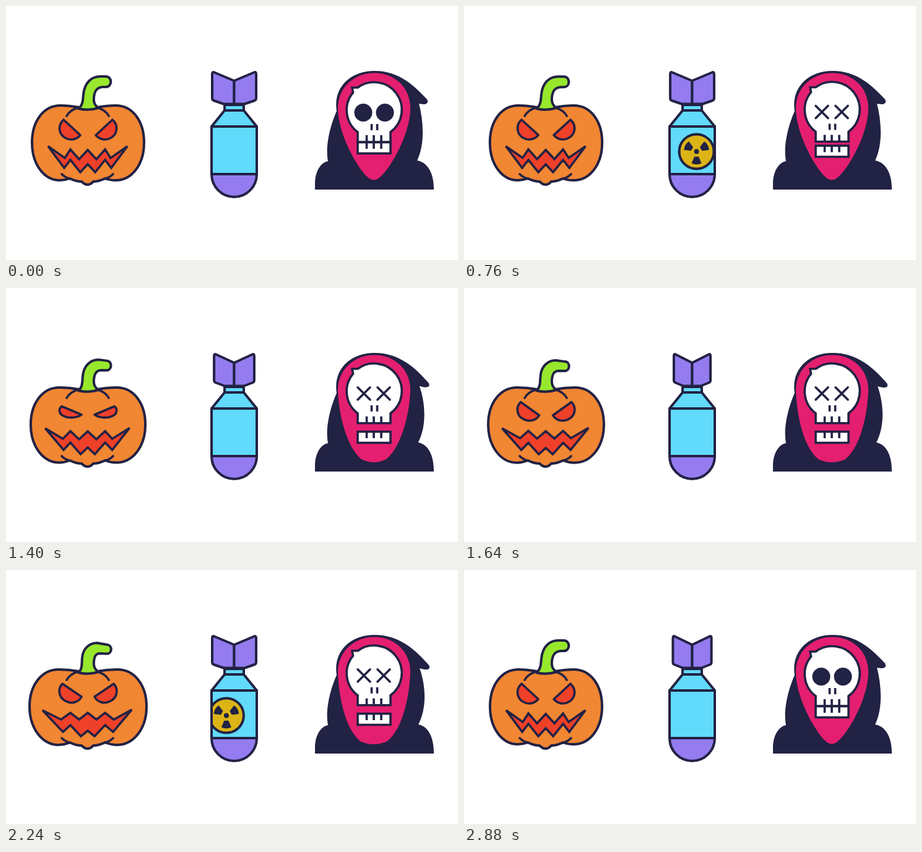
Write an HTML page that moves like this. It is 730 px wide and 411 px high and loops after 2920 ms.

```html
<!DOCTYPE html>
<html lang="en">
<head>
<meta charset="utf-8">
<title>Spooky icons</title>
<style>
  html, body { margin: 0; width: 100%; height: 100%; overflow: hidden; background: #fff; }
  svg { display: block; width: 730px; height: 411px; }
  .line { stroke: #222244; stroke-width: 4; stroke-linejoin: round; stroke-linecap: round; }
  .thin { stroke-width: 3.6; }
  .none { fill: none; }
  .butt { stroke-linecap: butt; }
  .miter { stroke-linejoin: miter; }
  .dark { fill: #222244; }
  .orange { fill: #f18633; }
  .red { fill: #ef4029; }
  .green { fill: #97e82c; }
  .purple { fill: #947cf0; }
  .cyan { fill: #61dafb; }
  .yellow { fill: #dcb416; }
  .pink { fill: #e41f70; }
  .white { fill: #fff; }
  #fins path { vector-effect: non-scaling-stroke; }
</style>
</head>
<body>
<svg viewBox="0 0 730 411">
  <defs>
    <clipPath id="hull"><rect x="332" y="195" width="73" height="77"/></clipPath>
    <path id="blade" d="M-3 9 L-7 18.5 Q0 21.5 7 18.5 L3 9 Z" stroke="#222244" stroke-width="1.5" stroke-linejoin="round"/>
    <g id="cross"><path class="line thin none" d="M-10 -10 L10 10 M10 -10 L-10 10"/></g>
  </defs>

  <g id="pumpkin">
    <path id="body" class="line orange"/>
    <path class="line thin none" d="M98 178 C101 172 107 167 118 164 M166 178 C163 172 157 167 146 164 M90 272 C94 276 98 278 103 279.500 M173 272 C169 276 165 278 160 279.500"/>
    <path id="stem" class="line green"/>
    <path id="eye" class="line thin red"/>
    <use href="#eye" transform="matrix(-1 0 0 1 265 0)"/>
    <path id="mouth" class="line thin red miter"/>
  </g>

  <g id="bomb">
    <path class="line cyan" d="M353 160 H384 V169 L405 195 V272 H332 V195 L353 169 Z"/>
    <g clip-path="url(#hull)">
      <g id="badge">
        <circle class="line yellow" r="28"/>
        <circle class="dark" r="4"/>
        <g class="dark">
          <use href="#blade"/>
          <use href="#blade" transform="rotate(120)"/>
          <use href="#blade" transform="rotate(240)"/>
        </g>
      </g>
    </g>
    <path class="line purple" d="M332 272 H405 A36.500 37 0 0 1 332 272 Z"/>
    <path class="line none" d="M353 169 H384 M332 195 H405 M332 195 V272 M405 195 V272"/>
    <g id="fins">
      <path id="fin" class="line purple" d="M0 121 L-32 107.500 Q-35.500 106 -35.500 110 V149 Q-35.500 152 -33 153 L-17 158.500 H0 Z"/>
      <path class="line purple" d="M0 121 L32 107.500 Q35.500 106 35.500 110 V149 Q35.500 152 33 153 L17 158.500 H0 Z"/>
    </g>
  </g>

  <g id="reaper">
    <path id="hood" class="dark"/>
    <path id="face" class="pink"/>
    <g id="jaw">
      <rect class="line thin white miter" x="568" y="220.500" width="53" height="18"/>
      <path class="line thin none butt" d="M582.500 221 V231 M594 221 V231 M606 221 V231"/>
    </g>
    <g id="head">
      <path class="line thin white miter" d="M568 220 V204 A44.500 44.500 0 0 1 560.500 140 L559 132 L568 132 A44.500 44.500 0 1 1 621 204 V220 Z"/>
      <path class="line thin none butt" d="M582.500 209 V220 M594 209 V220 M606 209 V220 M590.500 191 V201 M599.500 191 V201"/>
      <circle class="dark socket" cx="577" cy="172.500"/>
      <circle class="dark socket" cx="612" cy="172.500"/>
      <use class="mark" href="#cross" data-x="578"/>
      <use class="mark" href="#cross" data-x="610"/>
    </g>
  </g>
</svg>
<script>
  const LOOP = 2920, STEP = 40, SPIN = 1500;
  const BADGE_SPEED = 0.1425, BADGE_MID = [707, 2325];
  const NUM = /-?\d+(\.\d+)?/g;

  // Path pairs share one structure, so they can be blended number by number.
  const body = [
    "M118 164 C107 162 98 161 88 161 C60 161 42 187 42 221 C42 257 62 282 87 282 C94 282 98 281 103 279 C109 282 115 284 122 284 Q127 289 131.5 289 Q137 289 141 284 C149 284 154 282 160 279 C165 281 170 282 177 282 C203 282 223 257 223 221 C223 187 205 161 177 161 C167 161 158 162 147 164 Z",
    "M118 164 C107 162 97 161 85 161 C57 161 38 187 38 221 C38 257 59 283 85 283 C94 283 98 281 103 279 C109 282 115 284 122 284 Q127 289 131.5 289 Q137 289 141 284 C149 284 154 282 160 279 C165 281 170 283 179 283 C206 283 227 257 227 221 C227 187 208 161 180 161 C168 161 158 162 147 164 Z"
  ];
  const stem = [
    "M117 166 C125 160 124 150 125 143 C127 123 139 114 152 114 L161 114 C172 114 172 131 161 131 L156 131 C145 132 143 140 142 147 C141 157 144 161 149 165 Q133 170 117 166 Z",
    "M117 166 C124 160 122 150 123 142 C124 127 135 118 147 118 L164 121 C172 122 172 136 162 135.5 L152 135 C144 135 143 141 142 147 C141 157 144 161 149 165 Q133 170 117 166 Z"
  ];
  const eye = [
    "M93 184 L120 209 C113 217 103 218 95 213 C85 207 83 193 93 184 Z",
    "M91 184 L122 205 C117 215 105 217 96 212 C85 206 83 193 91 184 Z"
  ];
  const squint = "M90 191.5 L122 205 C113 211 99 211 91 206 C85 202 85 195 90 191.5 Z";
  const mouth = [
    "M68 227 L95 246 L104 232 L118 248 L132 233 L146 248 L160 232 L169 246 L196 227 L170 262 L160 249 L144 269 L132 256 L120 269 L104 249 L94 262 Z",
    "M59 227 L89 242 L104 231 L118 242 L132 231 L146 242 L160 231 L174 242 L203 226 L173 262 L160 251 L143 269 L132 260 L121 269 L104 251 L92 262 Z"
  ];
  const hood = [
    "M499 297 V285 C500 266 509 253 520 251 C515 225 525 190 534 170 C528 132 556 105 595 105 C636 105 660 130 680 151 C683 156 680 161 667 158 C675 190 676 225 664 250 C681 253 691 270 691 297 Z",
    "M499 297 V285 C500 266 509 253 520 251 C515 225 525 190 534 170 C528 132 556 105 595 105 C636 105 662 130 683 154 C686 159 683 164 668 159 C679 190 679 225 666 250 C682 253 691 270 691 297 Z"
  ];
  const face = [
    "M595 108.5 C561 108.5 536 133 536 165 C536 205 565 258 582 275 Q594 288 606 275 C624 258 653 205 653 165 C653 133 629 108.5 595 108.5 Z",
    "M595 108.5 C561 108.5 536 133 536 165 C537 200 546 255 572 277 Q594 287 616 277 C642 255 652 200 653 165 C653 133 629 108.5 595 108.5 Z"
  ];

  const $ = id => document.getElementById(id);
  const all = sel => document.querySelectorAll(sel);

  function blend(a, b, k) {
    const ends = b.match(NUM);
    let i = 0;
    return a.replace(NUM, v => +(+v + (ends[i++] - v) * k).toFixed(2));
  }

  function ease(from, to, t) {
    const x = Math.min(1, Math.max(0, (t - from) / (to - from)));
    return x * x * (3 - 2 * x);
  }

  const pulse = (a, b, c, d, t) => ease(a, b, t) - ease(c, d, t);
  const morph = (id, pair, k) => $(id).setAttribute("d", blend(...pair, k));
  const move = (el, value) => el.setAttribute("transform", value);

  function drawPumpkin(t) {
    const grin = pulse(560, 2200, 2460, 2880, t);
    morph("body", body, grin);
    morph("stem", stem, grin);
    morph("mouth", mouth, grin);
    morph("eye", [blend(...eye, grin), squint], pulse(1120, 1400, 1400, 1680, t));
  }

  function drawBomb(t) {
    const width = Math.abs(Math.cos(2 * Math.PI * t / SPIN));
    move($("fins"), `translate(368.5 0) scale(${Math.max(width, 0.01)} 1)`);
    const mid = BADGE_MID[t < SPIN ? 0 : 1];
    move($("badge"), `translate(${368 + BADGE_SPEED * (t - mid)} 235.5)`);
  }

  function drawReaper(t) {
    const open = pulse(400, 1160, 2400, 2800, t);
    const wide = pulse(760, 1600, 2260, 2620, t);
    const socket = 1 - pulse(200, 440, 2400, 2560, t);
    const mark = pulse(400, 640, 2260, 2420, t);
    morph("hood", hood, wide);
    morph("face", face, wide);
    move($("jaw"), `translate(0 ${12 * open})`);
    move($("head"), `translate(0 ${-1.2 * open})`);
    all(".socket").forEach(c => c.setAttribute("r", 14.5 * socket));
    all(".mark").forEach(m => {
      move(m, `translate(${m.dataset.x} 172) scale(${mark})`);
      m.style.visibility = mark > 0 ? "visible" : "hidden";
    });
  }

  const start = performance.now();

  function frame() {
    const t = Math.floor(((performance.now() - start) % LOOP) / STEP) * STEP;
    drawPumpkin(t);
    drawBomb(t);
    drawReaper(t);
    requestAnimationFrame(frame);
  }
  frame();
</script>
</body>
</html>
```
